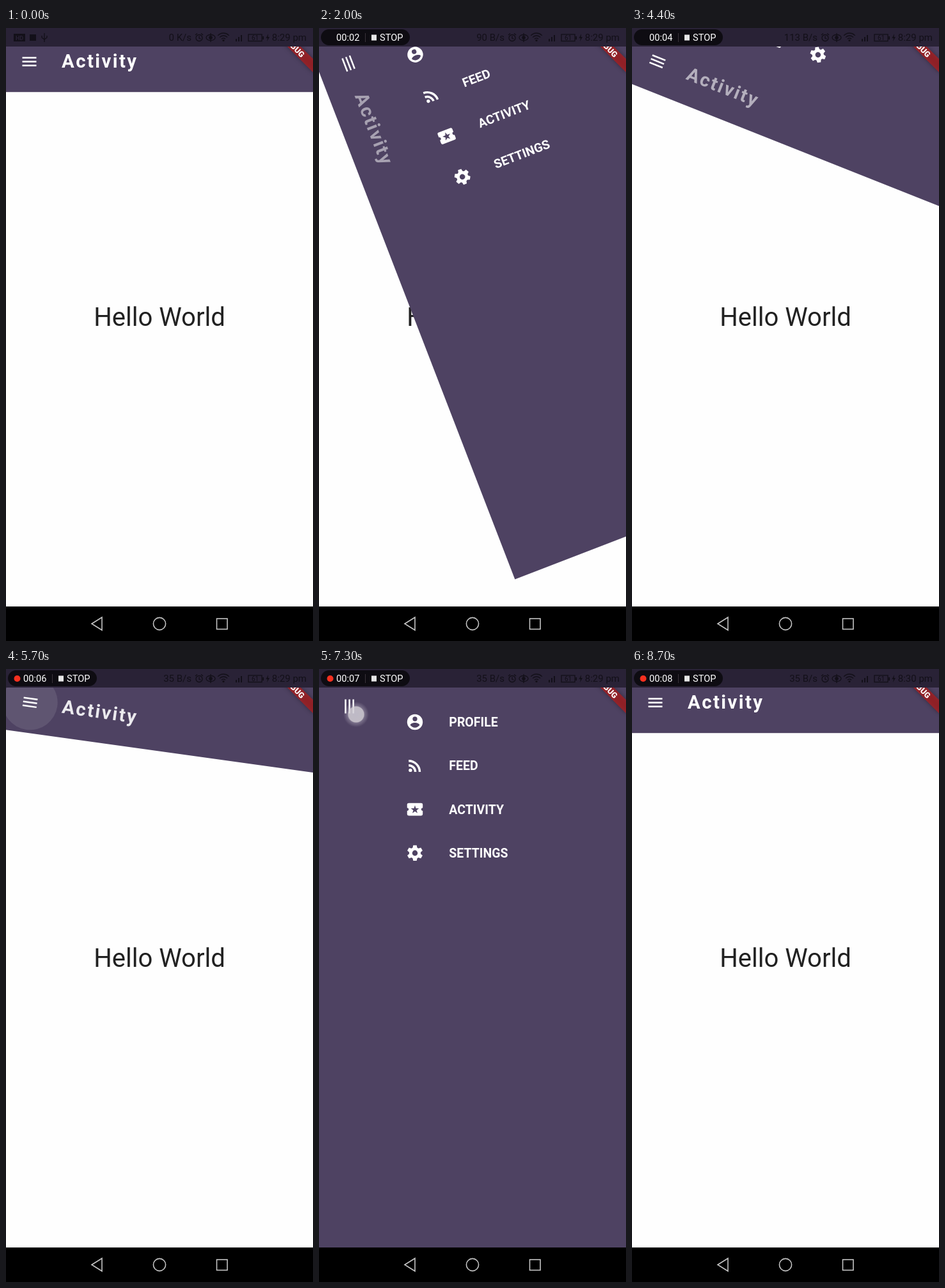
An HTML page with a canvas for the animation above (8800 ms loop, 480 by 959 pixels).

```html
<!DOCTYPE html>
<html lang="en">
<head>
<meta charset="utf-8">
<title>Swinging menu</title>
<style>
  html, body { margin: 0; width: 100%; height: 100%; overflow: hidden; background: #000; }
  canvas { display: block; width: 480px; height: 959px; }
</style>
</head>
<body>
<canvas id="stage" width="480" height="959"></canvas>
<script>
const ctx = document.getElementById('stage').getContext('2d');
const LOOP = 8800, STEP = 100, SWING = 1000, TAU = Math.PI * 2;
const W = 480, TOP = 29, BOTTOM = 905;
const PANEL = '#4e4262', STATUS = '#292236', DIM = '#131019';
const PIVOT = { x: 39.1, y: 61.1 };
const DP = 1.222;
const FONT = 'Roboto, sans-serif';

// Each tap: finger down, ripple start, swing start
const TAPS = [
  { down: 1100, press: 1300, go: 1500, x: 36, y: 74, open: true },
  { down: 3500, press: 3700, go: 3820, x: 64.5, y: 63, open: false },
  { down: 5500, press: 5500, go: 5592, x: 36, y: 74, open: true },
  { down: 7200, press: 7400, go: 7600, x: 58, y: 71, open: false }
];
// Recording light: on and off times
const BLINKS = [[600, 1300], [2300, 2800], [3300, 3800], [4500, 5000],
  [5500, 6000], [6500, 6900], [7200, 7700], [8200, 8800]];

const ACCOUNT = new Path2D('M12 2a10 10 0 1 0 0 20a10 10 0 1 0 0-20z' +
  'M12 5a3 3 0 1 1 0 6a3 3 0 1 1 0-6zM12 19.2c-2.5 0-4.71-1.28-6-3.22' +
  '.03-1.99 4-3.08 6-3.08s5.97 1.09 6 3.08c-1.29 1.94-3.5 3.22-6 3.22z');

const clamp = v => Math.max(0, Math.min(1, v));

function bounce(p) {
  const k = 7.5625;
  if (p < 1 / 2.75) return k * p * p;
  if (p < 2 / 2.75) return k * (p - 1.5 / 2.75) ** 2 + 0.75;
  if (p < 2.5 / 2.75) return k * (p - 2.25 / 2.75) ** 2 + 0.9375;
  return k * (p - 2.625 / 2.75) ** 2 + 0.984375;
}

function menuState(t) {
  let turn = 0, progress = 0;
  for (const tap of TAPS) {
    if (t < tap.go) break;
    const p = clamp((t - tap.go) / SWING);
    progress = tap.open ? p : 1 - p;
    turn = tap.open ? bounce(p) : 1 - bounce(p);
  }
  return { turn, progress };
}

function text(str, x, y, size, color, weight = 400, align = 'left', spacing = 0) {
  ctx.font = `${weight} ${size}px ${FONT}`;
  ctx.letterSpacing = spacing + 'px';
  ctx.textAlign = align;
  ctx.fillStyle = color;
  ctx.fillText(str, x, y);
}

function rect(x, y, w, h, color) {
  ctx.fillStyle = color;
  ctx.fillRect(x, y, w, h);
}

function disc(x, y, r, color) {
  ctx.fillStyle = color;
  ctx.beginPath();
  ctx.arc(x, y, r, 0, TAU);
  ctx.fill();
}

function arc(x, y, r, from = 0, to = TAU) {
  ctx.beginPath();
  ctx.arc(x, y, r, from, to);
  ctx.stroke();
}

function polyline(points, closed) {
  ctx.beginPath();
  points.forEach(p => ctx.lineTo(...p));
  if (closed) ctx.closePath();
}

function spun(angle, x, y, draw) {
  ctx.save();
  ctx.translate(x, y);
  ctx.rotate(angle);
  ctx.translate(-x, -y);
  draw();
  ctx.restore();
}

// Menu icons live on a 24 unit grid
const ICONS = {
  profile() { ctx.fill(ACCOUNT, 'evenodd'); },
  feed() {
    disc(6.18, 17.82, 2.18, '#fff');
    ctx.lineWidth = 2.83;
    arc(4, 20, 8.49, -Math.PI / 2, 0);
    arc(4, 20, 14.15, -Math.PI / 2, 0);
  },
  ticket() {
    ctx.beginPath();
    ctx.roundRect(2, 4, 20, 16, 2);
    ctx.fill();
    disc(2, 12, 2, PANEL);
    disc(22, 12, 2, PANEL);
    const star = [];
    for (let i = 0; i < 10; i++) {
      const r = i % 2 ? 2.2 : 5.5, a = i * TAU / 10 - TAU / 4;
      star.push([12 + r * Math.cos(a), 12.4 + r * Math.sin(a)]);
    }
    polyline(star, true);
    ctx.fill();
  },
  gear() {
    disc(12, 12, 7.4, '#fff');
    for (let i = 0; i < 6; i++) {
      spun(i * TAU / 6, 12, 12, () => {
        polyline([[9, 6], [9.8, 2], [14.2, 2], [15, 6]], true);
        ctx.fill();
      });
    }
    disc(12, 12, 3.5, PANEL);
  }
};
const ITEMS = [['profile', 'PROFILE'], ['feed', 'FEED'], ['ticket', 'ACTIVITY'], ['gear', 'SETTINGS']];

function drawItem([icon, label], i) {
  const y = 83 + i * 68.3;
  ctx.save();
  ctx.translate(150, y);
  ctx.scale(DP, DP);
  ctx.translate(-12, -12);
  ctx.fillStyle = ctx.strokeStyle = '#fff';
  ICONS[icon]();
  ctx.restore();
  text(label, 203.3, y + 7, 19.55, '#fff', 700);
}

function drawRipple(t) {
  for (const tap of TAPS) {
    if (t < tap.press) continue;
    const grow = clamp((t - tap.press) / 200);
    const fade = 1 - clamp((t - tap.go - 50) / 250);
    if (fade > 0) disc(47.6, 58.5, 12 + 31 * grow, `rgba(255,255,255,${0.13 * fade})`);
  }
}

function drawPanel(t) {
  const { turn, progress } = menuState(t);
  spun((turn - 1) * Math.PI / 2, PIVOT.x, PIVOT.y, () => {
    rect(0, 0, W, BOTTOM, PANEL);
    drawRipple(t);
    for (const x of [-6.1, 0, 6.1]) rect(47.6 + x - 1.25, 47.5, 2.5, 22, '#fff');
    ITEMS.forEach(drawItem);
    // The title reads across when the panel is shut
    spun(Math.PI / 2, PIVOT.x, PIVOT.y, () => {
      ctx.globalAlpha = 1 - progress;
      text('Activity', 87, 62, 29.3, '#fff', 700, 'left', 2.44);
      ctx.globalAlpha = 1;
    });
  });
}

function drawBanner() {
  ctx.save();
  ctx.translate(W, 0);
  ctx.rotate(Math.PI / 4);
  ctx.shadowColor = 'rgba(0,0,0,.5)';
  ctx.shadowBlur = 7;
  rect(-49, 34.2, 98, 14.7, 'rgba(183,28,28,.7)');
  ctx.shadowColor = 'transparent';
  text('DEBUG', 0, 46, 12.5, '#fff', 900, 'center');
  ctx.restore();
}

function drawStatusIcons(t) {
  ctx.strokeStyle = DIM;
  ctx.lineWidth = 1.3;
  // left side
  rect(12, 9, 18, 12, DIM);
  text('HD', 21, 18.5, 9, STATUS, 700, 'center');
  rect(37, 10, 10, 10, DIM);
  polyline([[60, 8], [60, 22]]);
  ctx.stroke();
  polyline([[56, 12], [56, 15], [60, 18], [64, 15], [64, 12]]);
  ctx.stroke();

  const speed = t < 600 ? '0 K/s' : t < 3000 ? '90 B/s' : t < 5000 ? '113 B/s' : '35 B/s';
  text(speed, 290, 20, 15, DIM, 400, 'right');
  // alarm
  arc(302, 15.5, 5);
  polyline([[302, 12.5], [302, 16], [304.5, 17]]);
  ctx.stroke();
  polyline([[296, 11], [299, 8.5]]);
  ctx.stroke();
  polyline([[305, 8.5], [308, 11]]);
  ctx.stroke();
  // eye
  ctx.beginPath();
  ctx.ellipse(320, 15, 7, 4.5, 0, 0, TAU);
  ctx.stroke();
  disc(320, 15, 2.8, DIM);
  polyline([[320, 8], [320, 22]]);
  ctx.stroke();
  // wireless
  for (const r of [4, 8, 12]) arc(340, 20, r, -2.4, -0.74);
  disc(340, 19.5, 1.6, DIM);
  // signal
  for (let i = 0; i < 3; i++) rect(359 + i * 4, 17 - i * 3, 2, 4 + i * 3, DIM);
  // battery and bolt
  ctx.strokeRect(379, 10, 21, 10.5);
  rect(401, 13, 2, 5, DIM);
  text('61', 389.5, 19, 10, DIM, 400, 'center');
  polyline([[410, 9], [406.5, 16], [409, 16], [408, 21], [412, 14], [409.5, 14]], true);
  ctx.fill();
  text(t < 8200 ? '8:29 pm' : '8:30 pm', 470, 20, 15, DIM, 400, 'right');
}

function drawRecorder(t) {
  const alpha = clamp((t - 100) / 400);
  if (!alpha) return;
  ctx.globalAlpha = alpha;
  ctx.fillStyle = '#0e0c12';
  ctx.beginPath();
  ctx.roundRect(3, 2, 139, 25, 12.5);
  ctx.fill();
  if (BLINKS.some(([on, off]) => t >= on && t < off)) disc(17.5, 15, 5, '#f5301f');
  const seconds = Math.min(8, Math.floor((t + 300) / 1000));
  text('00:0' + seconds, 27, 20.2, 14.6, '#fff');
  rect(72, 8, 1, 14, '#39333a');
  rect(82, 10.5, 8, 9, '#e6e6e6');
  text('STOP', 95, 20.2, 14.6, '#fff');
  ctx.globalAlpha = 1;
}

function drawTouch(t) {
  for (const { down, go, x, y } of TAPS) {
    if (t < down || t > go + 40) continue;
    const glow = ctx.createRadialGradient(x, y, 0, x, y, 20);
    glow.addColorStop(0, 'rgba(205,202,212,.88)');
    glow.addColorStop(0.6, 'rgba(212,208,214,.85)');
    glow.addColorStop(0.67, 'rgba(200,194,208,.35)');
    glow.addColorStop(1, 'rgba(200,194,208,0)');
    disc(x, y, 20, glow);
  }
}

function drawNav() {
  rect(0, BOTTOM, W, 54, '#000');
  ctx.strokeStyle = '#c4c4c4';
  ctx.lineWidth = 1.6;
  polyline([[134, 932], [150, 922], [150, 942]], true);
  ctx.stroke();
  arc(240, 932, 9.6);
  ctx.strokeRect(329.5, 924, 16.5, 16.5);
}

function draw(t) {
  rect(0, 0, W, BOTTOM, '#fefefe');
  text('Hello World', 240, 466, 40, '#212121', 400, 'center');
  drawPanel(t);
  drawBanner();
  rect(0, 0, W, TOP, STATUS);
  drawStatusIcons(t);
  drawRecorder(t);
  drawTouch(t);
  drawNav();
}

const start = performance.now();
function tick() {
  const t = (performance.now() - start) % LOOP;
  draw(Math.floor(t / STEP) * STEP);
  requestAnimationFrame(tick);
}
tick();
</script>
</body>
</html>
```
